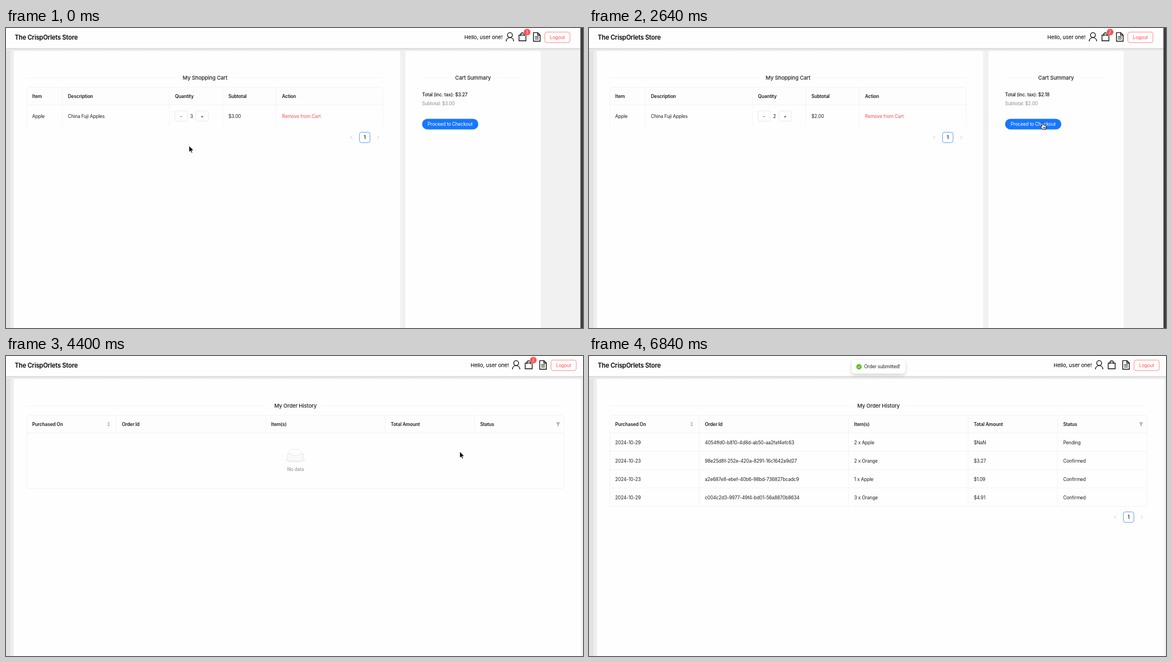
Write an HTML page that moves like this. It is 1037 by 540 pixels and loops after 8360 ms.

```html
<!DOCTYPE html>
<html lang="en">
<head>
<meta charset="utf-8">
<title>Shop checkout</title>
<style>
  html, body { margin: 0; width: 100%; height: 100%; overflow: hidden; background: #f1f1f1; }
  svg { display: block; width: 1037px; height: 540px; }
  text { font-family: Inter, Roboto, sans-serif; letter-spacing: -.016em; white-space: pre; }
</style>
</head>
<body>
<svg id="stage" viewBox="0 0 1037 540">
  <defs>
    <linearGradient id="headShade" x2="0" y2="1">
      <stop stop-color="#d9d9d9"/><stop offset="1" stop-color="#f0f0f0"/>
    </linearGradient>
    <linearGradient id="edgeShade">
      <stop stop-color="#8a8a8a"/><stop offset=".45" stop-color="#333"/><stop offset="1" stop-color="#444"/>
    </linearGradient>
    <filter id="lift" x="-20%" y="-50%" width="140%" height="220%">
      <feDropShadow dx="0" dy="2.5" stdDeviation="3" flood-opacity=".2"/>
    </filter>
  </defs>
  <g id="scene"></g>
</svg>
<script>
const LOOP = 8360;
const INK = '#1f1f1f', GREY = '#8c8c8c', PALE = '#bfbfbf', RULE = '#f0f0f0';
const RED = '#ff4d4f', BLUE = '#1677ff', SKY = '#4096ff';
const scene = document.getElementById('scene');

// Pointer stops: time, x, y, shape
const pointer = [
  [0, 329, 212, 'arrow'], [300, 326, 200, 'arrow'], [450, 321, 185, 'arrow'],
  [600, 316, 172, 'arrow'], [800, 314.5, 165.5, 'hand'],
  [1570, 340, 166, 'arrow'], [1760, 480, 160, 'arrow'], [1950, 643, 156.5, 'arrow'],
  [2190, 760, 155, 'arrow'], [2340, 809, 158.5, 'arrow'], [2490, 812, 164, 'hand'],
  [2640, 815, 170, 'hand'], [2790, 815.5, 173.5, 'hand'], [4070, 815.5, 172, 'arrow'],
  [5580, 818, 200, 'arrow'], [5740, 823, 265, 'arrow'], [5900, 829, 345, 'arrow'],
  [6060, 834, 425, 'arrow'], [6220, 838, 485, 'arrow'], [6390, 841, 512, 'arrow'],
  [6690, 842, 516, 'arrow'], [6840, 0, 0, 'none']
];
const shapes = {
  arrow: `<path d="M0 0V11.6L2.7 9.1 4.4 13.1 6.3 12.3 4.6 8.4H8.2z" fill="#000" stroke="#fff" stroke-width=".8"/>`,
  hand: `<path d="M-1 1.2C-1-.3 1-.3 1 1.2V5C1.4 4.2 2.8 4.4 2.9 5.3 3.4 4.7 4.6 5 4.7 5.9
    5.3 5.4 6.6 5.8 6.6 7V9C6.6 10.5 5.8 11 5.7 12.8H0C-.5 11-2.6 9.3-3.3 7.6-3.6 6.4-2.3 6.1-1 7.7z
    M1.7 8.3V11M3.2 8.3V11M4.6 8.3V11" fill="#fff" stroke="#000" stroke-width=".9" stroke-linejoin="round"/>`,
  none: ''
};
const orders = [
  ['2024-10-29', '4054ffd0-b810-4d8d-ab50-aa2faf4efc63', '2 x Apple', '$NaN', 'Pending'],
  ['2024-10-23', '98e25d8f-252e-420a-8291-16c1642a9d27', '2 x Orange', '$3.27', 'Confirmed'],
  ['2024-10-23', 'a2e687e8-ebef-40b6-98bd-736827bcadc9', '1 x Apple', '$1.09', 'Confirmed'],
  ['2024-10-29', 'c004c2d3-9977-49f4-bd01-56a8870b8634', '3 x Orange', '$4.91', 'Confirmed']
];

// Text is placed by the middle of its capitals.
const text = (x, y, s, { size = 8.4, weight = 400, fill = INK, anchor = 'start' } = {}) =>
  `<text x="${x}" y="${y + size * .364}" font-size="${size}" font-weight="${weight}" fill="${fill}" text-anchor="${anchor}">${s}</text>`;
const centered = (x, y, s, style) => text(x, y, s, { ...style, anchor: 'middle' });
const rect = (x, y, w, h, fill, r = 0, stroke = 'none', line = .7) =>
  `<rect x="${x}" y="${y}" width="${w}" height="${h}" rx="${r}" fill="${fill}" stroke="${stroke}" stroke-width="${line}"/>`;
const path = (d, stroke, line = .7, fill = 'none') =>
  `<path d="${d}" stroke="${stroke}" stroke-width="${line}" fill="${fill}"/>`;

const heading = (left, right, gap, s) => {
  const mid = (left + right) / 2;
  return path(`M${left} 89.5H${mid - gap}M${mid + gap} 89.5H${right}`, '#f2f2f2') +
    centered(mid, 89.3, s, { size: 9.6, weight: 500 });
};

const tableHead = (left, right, columns, labels) =>
  path(`M${left} 138.5V111.5q0-5 5-5H${right - 5}q5 0 5 5V138.5z`, RULE, .8, '#fdfdfd') +
  path(columns.map(x => `M${x} 106.5V138.5`).join(''), RULE, .8) +
  labels.map((s, i) => text((i ? columns[i - 1] : left) + (i ? 10.2 : 9.6), 122.5, s, { weight: 600 })).join('');

const pager = (x, y) =>
  rect(x - 9.4, y - 9.4, 18.8, 18.8, '#fff', 3.6, BLUE) + centered(x, y, '1', { weight: 600 }) +
  path(`M${x - 22.4} ${y - 2.8}l-3.4 2.8 3.4 2.8M${x + 22.4} ${y - 2.8}l3.4 2.8-3.4 2.8`, PALE, .8);

function header(shift, badge) {
  return rect(0, 36, 1037, 5, 'url(#headShade)') + rect(0, 0, 1037, 36, '#fefefe') +
    text(15.8, 17, 'The CrispOrlets Store', { size: 11.2, weight: 600, fill: '#000' }) +
    `<g transform="translate(${shift})">` +
    text(823.8, 17, 'Hello, user one!', { size: 9.6, fill: '#000' }) +
    `<circle cx="905.7" cy="12.8" r="4.4" fill="none" stroke="#111" stroke-width="1.4"/>` +
    path('M899 23.9C899.3 15.2 912.1 15.2 912.4 23.9', '#111', 1.4) +
    path('M922 12.6H934.4V23H922zM925 14.5V12C925 7.6 931.4 7.6 931.4 12V14.5', '#111', 1.4) +
    path('M948 8.4H955.6L960 12.8V23.8H948zM955.4 8.6V13H960M950.6 16.2H957.4M950.6 19.6H957.4', '#111', 1.4) +
    (badge ? `<circle cx="936.5" cy="7.4" r="6.2" fill="${RED}" stroke="#fff" stroke-width=".6"/>` +
      centered(936.5, 7.4, badge, { size: 7.2, fill: '#fff' }) : '') +
    rect(968.4, 7.3, 45.2, 18.9, '#fff', 3.6, '#ff6b6d', .8) +
    centered(991, 17, 'Logout', { fill: RED }) + '</g>';
}

const leftEdge = rect(0, 36, 9, 504, '#e3e3e3') + path('M8 540V46q0-5 5-5H20V540z', 'none', 0, '#eee');
const card = (x, right) => rect(x, 41.3, right - x, 510, '#fefefe', 4);

function stepButton(x, sign, state) {
  const ring = { hover: SKY, focus: '#8fc0ff' }[state];
  return (ring && state !== 'over' ? rect(x - 1, 148.2, 24.6, 20.6, 'none', 4.2, '#dcebff', 1.6) : '') +
    rect(x, 149.2, 22.6, 18.6, '#fff', 3.6, ring || (state === 'over' ? SKY : '#dedede')) +
    centered(x + 11.3, 158.7, sign, { fill: state === 'over' || state === 'hover' ? SKY : INK });
}

function cartPage(t) {
  const updated = t >= 1760;
  const subtotal = updated ? '$2.00' : '$3.00';
  const columns = [101, 293.5, 389.5, 485.7];
  const overRow = t >= 600 && t < 1950;
  const minus = t < 800 ? '' : t < 1330 ? 'over' : t < 1570 ? 'hover' : t < 2340 ? 'focus' : '';
  const button = t >= 3090 && t < 3780 ? SKY : BLUE;
  return leftEdge + card(14, 708.3) + card(718, 961) +
    heading(37.5, 678, 50, 'My Shopping Cart') +
    tableHead(37.5, 678, columns, ['Item', 'Description', 'Quantity', 'Subtotal', 'Action']) +
    (overRow ? rect(47, 146, 519, 33, '#fbfbfb') : '') +
    path([37.5, ...columns, 678].map(x => `M${x} 138.5V177.5`).join(''), '#f3f3f3', .8) +
    text(47.1, 158.7, 'Apple') + text(111.2, 158.7, 'China Fuji Apples') +
    stepButton(303.6, '-', minus) + stepButton(341.2, '+', '') +
    centered(333.5, 158.7, t < 1330 ? '3' : '2') +
    text(399.8, 158.7, subtotal) + text(496, 158.7, 'Remove from Cart', { fill: RED }) +
    pager(644.8, 197) +
    heading(747.8, 931, 41.5, 'Cart Summary') +
    text(747.8, 119.8, `Total (inc. tax): ${updated ? '$2.18' : '$3.27'}`, { weight: 500, fill: '#111' }) +
    text(747.8, 135.5, `Subtotal: ${subtotal}`, { fill: GREY }) +
    rect(747.8, 164.5, 101, 19, '#e9f2ff', 9.5) + rect(747.8, 163.4, 101, 19.2, button, 9.6) +
    centered(798.2, 173, 'Proceed to Checkout', { fill: '#fff' }) +
    header(0, updated ? '2' : '3') + rect(1032, 0, 5, 540, 'url(#edgeShade)');
}

const emptyTable =
  path('M37.5 138.5V238.5H1003V138.5', RULE, .8) +
  `<g transform="translate(501 168) scale(.6)"><ellipse cx="32" cy="33" rx="32" ry="7" fill="#f5f5f5"/>` +
  path('M55 12.8L44.9 1.3Q44 0 42.9 0H21.1Q20 0 19.1 1.3L9 12.8V22H55z', '#d9d9d9', 1, '#fff') +
  path('M41.6 16Q41.6 13 43.8 13H55V31Q55 35 52 35H12Q9 35 9 31V13H20.2Q22.4 13 22.4 16 22.4 18.9 24.6 18.9H39.4Q41.6 18.9 41.6 16z', '#d9d9d9', 1, '#fafafa') +
  '</g>' + centered(520.2, 203.5, 'No data', { fill: GREY });

function orderRows(columns) {
  const starts = [47.1, ...columns.map(x => x + 10.2)];
  const lines = [37.5, ...columns, 1003].map(x => `M${x} 138.5V270.6`).join('') +
    orders.map((_, i) => `M37.5 ${171.5 + 33 * i}H1003`).join('');
  return path(lines, RULE, .8) +
    orders.map((row, i) => row.map((s, j) => text(starts[j], 155.8 + 33 * i, s)).join('')).join('') +
    pager(969.8, 290);
}

function toast(t) {
  const shown = Math.min(1, .5 + (t - 5440) / 280);
  return `<g opacity="${shown}" transform="translate(0 ${(shown - 1) * 12})">` +
    `<g filter="url(#lift)">${rect(472.6, 7.4, 95.6, 24, '#fff', 4.8)}</g>` +
    '<circle cx="485.2" cy="19.4" r="4.8" fill="#52c41a"/>' +
    path('M483 19.5l1.6 1.7 2.8-3.6', '#fff', 1) +
    text(494.6, 19.4, 'Order submitted!') + '</g>';
}

function historyPage(t) {
  const columns = [198, 466.4, 681.2, 842];
  return leftEdge + card(14, 1033.5) +
    heading(37.5, 1003, 48.5, 'My Order History') +
    tableHead(37.5, 1003, columns, ['Purchased On', 'Order Id', 'Item(s)', 'Total Amount', 'Status']) +
    path('M181.9 121.6h5.4l-2.7-3.2zM181.9 123.6h5.4l-2.7 3.2z', 'none', 0, '#b5b5b5') +
    path('M988.6 119.2h7.4l-2.5 4v3h-2.4v-3z', 'none', 0, '#b5b5b5') +
    (t < 5110 ? emptyTable : orderRows(columns)) +
    header(11.2, t < 5580 ? '2' : '') + (t >= 5440 ? toast(t) : '');
}

function draw(t) {
  const [, x, y, shape] = pointer.findLast(stop => stop[0] <= t);
  return (t < 4400 ? cartPage(t) : historyPage(t)) +
    `<g transform="translate(${x} ${y})">${shapes[shape]}</g>`;
}

let start, last;
function tick(now) {
  start ??= now;
  const markup = draw((now - start) % LOOP);
  if (markup !== last) scene.innerHTML = last = markup;
  requestAnimationFrame(tick);
}
requestAnimationFrame(tick);
</script>
</body>
</html>
```
